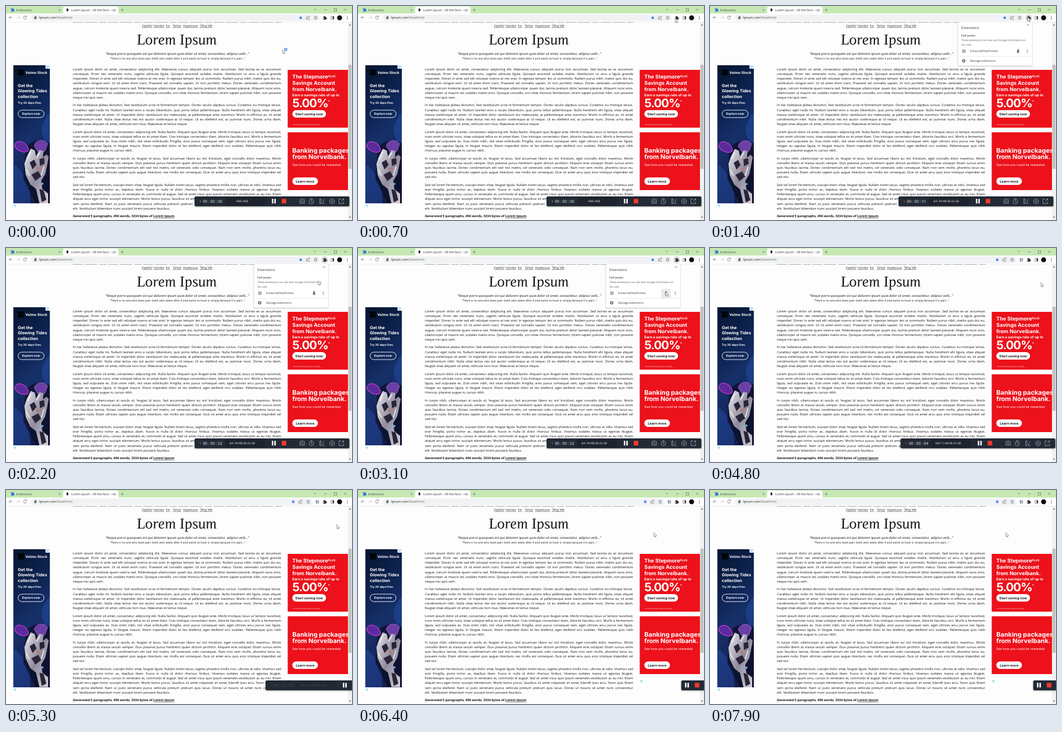
An HTML page for the animation above (8000 ms loop, 600 by 372 pixels).

```html
<!DOCTYPE html>
<html lang="en">
<head>
<meta charset="utf-8">
<title>Browser recording</title>
<style>
html, body { margin: 0; width: 100%; height: 100%; overflow: hidden; background: #fdfdfd; }
svg { display: block; width: 600px; height: 372px; }
text { font-family: "Open Sans", sans-serif; text-rendering: geometricPrecision; white-space: pre; }
.ad text { font-family: Inter, sans-serif; font-weight: 700; fill: #fff; }
.mid { text-anchor: middle; }
.line { fill: none; stroke: #666; stroke-width: .7; }
.bar .line { stroke: #b4b9c6; stroke-width: .7; }
</style>
</head>
<body>
<svg viewBox="0 0 600 372">
<defs>
  <linearGradient id="night" x1="0" y1="0" x2=".25" y2="1">
    <stop offset="0" stop-color="#07142f"/><stop offset=".35" stop-color="#0d2350"/>
    <stop offset=".6" stop-color="#16306a"/><stop offset="1" stop-color="#141d48"/>
  </linearGradient>
  <linearGradient id="silver" x1="0" y1="0" x2="1" y2="1">
    <stop offset="0" stop-color="#ebe8ef"/><stop offset=".5" stop-color="#8f8b9c"/><stop offset="1" stop-color="#d6d2dc"/>
  </linearGradient>
  <linearGradient id="fadeTab"><stop offset=".85" stop-color="#333"/><stop offset="1" stop-color="#333" stop-opacity=".1"/></linearGradient>
  <filter id="shadow" x="-10%" y="-20%" width="120%" height="140%">
    <feDropShadow dx="0" dy=".8" stdDeviation="1.3" flood-opacity=".35"/>
  </filter>
  <clipPath id="page"><rect y="28" width="593" height="344"/></clipPath>
  <clipPath id="banner"><rect x="12.5" y="103" width="63.5" height="240"/></clipPath>
  <path id="puzzle" d="M-2.600-1.700h1.600a1.100 1.100 0 1 1 2 0h1.600v1.600a1.100 1.100 0 1 1 0 2v1.400h-5.200v-1.600a1 1 0 1 0 0-1.800z"/>
  <path id="close" d="M-1.6-1.600 1.600 1.600M1.600-1.600-1.600 1.600"/>
  <g id="dots" fill="#555"><circle cy="-2.2" r=".7"/><circle r=".7"/><circle cy="2.2" r=".7"/></g>
  <g id="marker"><rect x="-3" y="-3" width="6" height="6" fill="#d9dfe8"/><path d="M-3-2h6M-3 0h6M-3 2h6" stroke="#7d8796" stroke-width=".8"/><path d="M-1.5-3v6" stroke="#5a78a8" stroke-width=".7"/></g>
  <path id="choices" d="M-2-2h4L0 2z" fill="#cdeef5" stroke="#6cc3d8" stroke-width=".6"/>
  <g id="pauseStop"><path d="M461 335.200h2.500v8h-2.500zM465.300 335.200h2.500v8h-2.500z" fill="#fff"/><rect x="478" y="335.200" width="8" height="8" rx=".6" fill="#f4372d"/></g>
</defs>

<!-- page -->
<rect width="600" height="372" fill="#fdfdfd"/>
<g clip-path="url(#page)" fill="#161616">
  <path d="M116 28.500H478" stroke="#666" stroke-width=".7" stroke-dasharray="17 3 22 4 12 3"/>
  <g id="langs" font-size="4.800" text-decoration="underline"></g>
  <text class="mid" transform="translate(297 67) skewX(9)" font-size="26.300" style="font-family:'Liberation Serif',serif" font-style="italic">Lorem Ipsum</text>
  <text class="mid" x="297" y="85" font-size="5.950" font-style="italic">"Neque porro quisquam est qui dolorem ipsum quia dolor sit amet, consectetur, adipisci velit..."</text>
  <text class="mid" x="297.500" y="93" font-size="4.850">"There is no one who loves pain itself, who seeks after it and wants to have it, simply because it is pain..."</text>
  <g id="copy" font-size="5.600"></g>
  <text x="116" y="367.200" font-size="5.600" font-weight="700">Generated 5 paragraphs, 496 words, 3334 bytes of <tspan text-decoration="underline">Lorem Ipsum</tspan></text>

  <g class="ad" clip-path="url(#banner)">
    <rect x="12.500" y="103" width="63.500" height="240" fill="url(#night)"/>
    <path d="M76 186C54 208 62 232 76 246zM12 275C30 285 44 312 42 343H12z" fill="#2450b0" opacity=".45"/>
    <g id="art">
      <path d="M34 246q18-20 42-8v106H52L30 300z" fill="#0b0f26" opacity=".75"/>
      <path d="M15 243C17 231 32 234 38 246S20 256 15 243z" fill="#5b2a9c" stroke="#d338d4" stroke-width="1.200"/>
      <path d="M49 243c2-10 16-13 23-4l-4 12-9 8z" fill="#6b3fa5" stroke="#b06be0" stroke-width=".8"/>
      <path d="M36 262l7-14 7 3 2 10 6-11 7 2-1 11 6-5 4 4-3 16-3 14-7 12 2 14 10 8v17H58l-6-25-10-8-8-17-2-19z" fill="url(#silver)"/>
      <path d="M41 272l8-5 4 9-7 8zM58 266l8-2 1 10-8 4zM44 293l12-6 5 9-10 8zM58 318l7 2 5 17-8 4z" fill="#29243a"/>
      <path d="M38 266l5-13M53 264l6-10M35 284l6 11M66 279l-5 16" stroke="#fff" stroke-width="1.300"/>
      <circle cx="55" cy="282" r="2.300" fill="#e2694f"/><circle cx="63" cy="309" r="2" fill="#5fb3e4"/>
    </g>
    <rect x="20.500" y="110" width="10.500" height="11" rx="1.500" fill="#020509"/>
    <text x="33.800" y="118" font-size="6.200">Velmo Stock</text>
    <g font-size="7.300"><text x="20.500" y="140.500">Get the</text><text x="20.500" y="150">Glowing Tides</text><text x="20.500" y="159.500">collection</text></g>
    <text x="20.500" y="169.500" font-size="5">Try 30 days free.</text>
    <rect x="21" y="181" width="45" height="13" rx="6.500" fill="none" stroke="#fff" stroke-width=".9"/>
    <text class="mid" x="43.500" y="189.400" font-size="5.200">Explore now</text>
    <rect x="68.500" y="103" width="7.500" height="6" fill="#e9f6fb"/><use href="#choices" x="72.300" y="106"/>
  </g>
  <use href="#choices" x="15.500" y="347.500"/>
  <use href="#choices" x="491.500" y="333"/>

  <g class="ad">
    <rect x="488.500" y="111" width="104.500" height="100.500" fill="#ec111a"/>
    <g font-size="9">
      <text x="496.500" y="126.300">The Stepmore<tspan font-size="5" dy="-2.500">PLUS</tspan></text>
      <text x="496.500" y="137">Savings Account</text>
      <text x="496.500" y="147.700">from Norvelbank.</text>
    </g>
    <text x="496.500" y="156.500" font-size="6.200">Earn a savings rate of up to</text>
    <text x="496.500" y="175.500" font-size="20.500" letter-spacing="-1">5.00%<tspan font-size="6" dy="-8">*</tspan></text>
    <rect x="496.500" y="181" width="58.500" height="13" rx="6.500" fill="#fff"/>
    <text class="mid" x="525.700" y="189.600" font-size="5.900" style="fill:#222">Start saving now</text>
    <text x="497" y="206.500" font-size="2.600" style="font-weight:400">*Six monthly rates quoted, terms apply.</text>
    <rect x="488.500" y="219.500" width="104.500" height="100.500" fill="#ec111a"/>
    <g font-size="11"><text x="496.500" y="254.700">Banking packages</text><text x="496.500" y="266">from Norvelbank.</text></g>
    <text x="496.500" y="278" font-size="5.500" style="font-weight:400">See how you could be rewarded.</text>
    <rect x="496.500" y="298" width="44.500" height="13" rx="6.500" fill="#fff"/>
    <text class="mid" x="518.700" y="306.600" font-size="5.900" style="fill:#222">Learn more</text>
  </g>
</g>
<rect x="593" y="28" width="7" height="344" fill="#f1f1f1"/>
<rect x="593.800" y="102" width="5.400" height="181" fill="#c1c1c1"/>
<path d="M594.800 34l1.700-2.500 1.700 2.500zM594.800 366l1.700 2.500 1.700-2.500z" fill="#666"/>

<!-- browser frame -->
<rect width="600" height="14" fill="#c5e8b3"/>
<rect y="13" width="600" height="15" fill="#fdfdfd"/>
<path d="M0 28.200H600" stroke="#ddd" stroke-width=".5"/>
<path d="M96 14q3 0 3-3V4q0-3 3-3h90q3 0 3 3v7q0 3 3 3z" fill="#fdfdfd"/>
<use href="#puzzle" x="11" y="6.500" fill="#3f73df"/>
<text x="18" y="8.800" font-size="5.300" fill="#444">Extensions</text>
<rect x="105" y="4.500" width="3" height="4.500" fill="#222"/>
<text x="113" y="8.800" font-size="5.300" fill="url(#fadeTab)">Lorem Ipsum - All the facts - Lips</text>
<g class="line">
  <use href="#close" x="93" y="7"/><use href="#close" x="188" y="7"/>
  <path d="M199 7h5M201.500 4.500v5M534 5l2 2 2-2M551.500 6.500h5M569 4.500h4.500v4.500H569z"/><use href="#close" x="588" y="6.500"/>
  <path d="M11 20H5.500M8 17.500 5.500 20 8 22.500"/><path d="M18.500 20H24M21.500 17.500 24 20l-2.500 2.500" stroke="#bbb"/>
  <path d="M35.200 18.500a2.700 2.700 0 1 0 .5 2.300M35.700 16.800v2.200h-2.200"/>
</g>
<rect id="pill" x="43" y="14.700" width="501" height="11.500" rx="5.700" fill="#f0f2f3"/>
<path d="M49.300 19.500h3.400v3h-3.400zM50 19.500v-1a1 1 0 0 1 2 0v1" fill="#666" stroke="#666" stroke-width=".5"/>
<text x="57" y="22.400" font-size="5.600" fill="#222">lipsum.com<tspan fill="#666">/feed/html</tspan></text>
<g id="pillIcons">
  <circle cx="511" cy="20.500" r="2.200" fill="#4285f4"/>
  <path class="line" d="M523 19h-2v4h5v-2M523 21q0-3 3-3M524.800 16.500l1.700 1.500-1.700 1.500M537 17l.9 2.100 2.200.2-1.700 1.500.6 2.300-2-1.200-2 1.200.6-2.300-1.700-1.500 2.200-.2z"/>
</g>
<use id="pinned" href="#marker" x="540" y="20.500"/>
<circle id="glow" cx="552.500" cy="20.500" r="6" fill="#d9dbde"/>
<use href="#puzzle" x="552.500" y="20.500" fill="#333"/>
<path d="M563.500 18h5v5h-5z" class="line"/><path d="M566.300 18h2.500v5h-2.500z" fill="#444"/>
<circle cx="578.500" cy="20.500" r="4.300" fill="#0b0b0b"/>
<use href="#dots" x="592" y="20.500"/>

<!-- extensions popup -->
<g id="popup">
  <rect x="430" y="28" width="128.500" height="75.500" rx="1.500" fill="#fff" filter="url(#shadow)"/>
  <g fill="#333">
    <text x="436" y="40.200" font-size="6.100">Extensions</text>
    <text x="436" y="52.700" font-size="4.700" font-weight="600">Full access</text>
    <g font-size="4.500" fill="#555"><text x="436" y="60.500">These extensions can see and change information on</text><text x="436" y="68.500">this site.</text></g>
    <text x="451" y="80.300" font-size="4.900">EnhancedTextPointer</text>
    <text x="451" y="97" font-size="4.900">Manage extensions</text>
  </g>
  <use href="#close" x="551.500" y="33" class="line"/>
  <use href="#marker" x="440.500" y="78.500"/>
  <rect id="hover" x="526" y="71" width="16.500" height="16" fill="#e8eaed"/>
  <path id="pin" d="M532.500 75.500h3.400v.8l-.6.300v2l1.100 1.100v.7h-1.800v2.100h-.8v-2.100H532v-.7l1.100-1.100v-2l-.6-.3z"/>
  <use href="#dots" x="550" y="78.500"/>
  <path d="M430 87.500h128.500" stroke="#ddd" stroke-width=".6"/>
  <circle cx="440" cy="95.200" r="1.900" fill="none" stroke="#555" stroke-width="1.300"/><circle cx="440" cy="95.200" r="2.800" fill="none" stroke="#555" stroke-width=".8" stroke-dasharray="1.100"/>
</g>

<!-- recorder -->
<g id="recorder" class="bar">
  <rect x="327" y="331" width="268.500" height="17.300" rx="2.500" fill="#232936" filter="url(#shadow)"/>
  <g id="readout" fill="#fff">
    <rect x="380" y="332" width="69" height="15.300" rx="2" fill="#1d222d"/>
    <circle id="dot" cx="337" cy="339.500" r="1.100"/>
    <text id="clock" x="341.500" y="341.900" font-size="6.700"></text>
    <text id="size" class="mid" x="409.500" y="341.300" font-size="4.800"></text>
  </g>
  <use href="#pauseStop"/>
  <path class="line" d="M509.500 336.500h2l1-1.300h2.200l1 1.300h2v6.300h-8.200zM515.300 339.500a1.700 1.700 0 1 1-3.400 0 1.700 1.700 0 0 1 3.400 0M533.500 339.800a4 4 0 1 1-8 0 4 4 0 0 1 8 0M529.500 337v3l2 1M528 334.700h3M544 335.500v8h2.500v-8zM549 342.500l2.500-6.500M548.500 343.500h4M565.500 335l4 2.300v4.600l-4 2.300-4-2.300v-4.600zM567 339.600a1.500 1.500 0 1 1-3 0 1.500 1.500 0 0 1 3 0M581 335.500h-3.500v8h8V340M581.500 339.500l4-4M583 335.500h2.500v2.500"/>
</g>
<g id="mini" class="bar">
  <rect x="454.500" y="331" width="50" height="17.300" rx="2.500" fill="#232936" filter="url(#shadow)"/>
  <use href="#pauseStop"/>
</g>
<g id="cursor">
  <path d="M0 0v7.200l1.700-1.500 1.100 2.500 1.100-.5-1.100-2.400h2.300z" fill="#fff" stroke="#444" stroke-width=".5"/>
  <circle id="busy" cx="5.700" cy="0" r="2" fill="none" stroke="#2f8be0" stroke-width="1.300"/>
</g>
</svg>
<script>
const $ = id => document.getElementById(id);
const clamp = v => Math.max(0, Math.min(1, v));
const LOOP = 8000, LEFT = 116, COLUMN = 361, LEADING = 8.15, PARAGRAPH_GAP = 5.4;

function addText(parent, x, y, content) {
  const el = document.createElementNS("http://www.w3.org/2000/svg", "text");
  el.setAttribute("x", x);
  el.setAttribute("y", y);
  el.textContent = content;
  parent.append(el);
  return el;
}

[["Español", 236], ["Svenska", 256], ["ไทย", 277], ["Türkçe", 289], ["Українська", 307], ["Tiếng Việt", 336]]
  .forEach(([name, x]) => addText($("langs"), x, 36, name));

const paragraphs = `Lorem ipsum dolor sit amet, consectetur adipiscing elit. Maecenas cursus aliquam purus non accumsan. Sed lacinia ex ac accumsan
consequat. Proin nec venenatis nunc, sagittis vehicula ligula. Quisque euismod sodales mattis. Vestibulum ut arcu a ligula gravida
imperdiet. Donec in ante sed elit volutpat viverra at nec erat. In egestas tempor leo ut commodo. Nullam purus nibh, mattis quis dui eu,
vestibulum congue sem. Ut sit amet enim nunc. Praesent vel convallis sapien. Ut non porttitor metus. Donec venenatis condimentum
augue, rutrum molestie quam viverra sed. Pellentesque ullamcorper quam dui, lacinia pretium dolor laoreet placerat. Aliquam nunc eros,
ullamcorper ut mauris vel, sodales mattis eros. Quisque convallis, orci vitae rhoncus fermentum, lorem sapien pulvinar nibh, non posuere
neque nisi quis sem.

In hac habitasse platea dictumst. Sed vestibulum urna id fermentum tempor. Donec iaculis dapibus cursus. Curabitur eu tristique lectus.
Curabitur eget nulla mi. Nullam laoreet eros a turpis bibendum, quis porta tellus pellentesque. Nulla hendrerit elit ligula, vitae aliquet
massa scelerisque sit amet. Ut imperdiet dolor vestibulum dui malesuada, at pellentesque ante maximus. Morbi in efficitur ex, sit amet
condimentum nibh. Nulla vitae lectus nec est auctor scelerisque ac id neque. Ut eu eleifend est, ac pulvinar nunc. Donec urna diam,
feugiat vitae aliquam sit amet, vehicula non risus. Maecenas et lectus neque.

Lorem ipsum dolor sit amet, consectetur adipiscing elit. Nulla facilisi. Aliquam quis feugiat ante. Morbi tristique, lacus ut tempor euismod,
nunc enim ultricies nunc, vitae volutpat tellus ex sit amet diam. Cras tristique consectetur diam, lobortis faucibus orci. Morbi a fermentum
ligula, sed vulputate ex. Duis enim nibh, nisl vitae sollicitudin fringilla, eros purus consequat sem, eget ultrices arcu purus nec ligula.
Integer eu egestas ligula, in feugiat mauris. Etiam imperdiet dolor et leo eleifend, eget eleifend orci sodales. Pellentesque quis nibh
rhoncus, placerat augue in, cursus nibh.

In turpis nibh, ullamcorper at iaculis et, feugiat id lacus. Sed accumsan libero eu nisl tincidunt, eget convallis dolor maximus. Morbi
convallis libero at massa iaculis semper. Duis placerat purus hendrerit quam dictum porttitor. Aliquam erat volutpat. Etiam cursus enim
quis faucibus lacinia. Donec condimentum elit sed nisl mattis, vel venenatis odio consequat. Nam non sem mollis, pharetra lacus eu,
posuere nulla. Etiam ultricies sapien quis augue interdum, nec mollis est consequat. Duis sit amet arcu quis eros tristique imperdiet vel
sed nisi.

Sed vel lorem fermentum, suscipit dolor vitae, feugiat ligula. Nullam lorem lacus, sagittis pharetra mollis non, ultrices at odio. Vivamus sed
erat fringilla, porta tortor ac, dapibus diam. Fusce in nulla id dolor rhoncus finibus. Vivamus sodales massa ut egestas feugiat.
Pellentesque quam arcu, cursus in venenatis at, commodo id augue. Sed sit amet risus quis ipsum venenatis vestibulum ac eu nisi. Etiam
aliquet arcu eget tortor suscipit elementum. Morbi lectus purus, faucibus sit amet vulputate sit amet, blandit quis arcu. Nunc quis Etiam
sem porta eleifend. Nam ut justo venenatis purus vehicula pretium pretium quis lacus. Donec ut mauris sit amet nunc consectetur
elit. Vestibulum bibendum nunc suscipit lorem posuere faucibus.`.split("\n\n");

// Justify every line but the last by widening its word gaps.
let baseline = 112;
for (const paragraph of paragraphs) {
  const lines = paragraph.split("\n");
  lines.forEach((line, i) => {
    const el = addText($("copy"), LEFT, baseline, line);
    if (i < lines.length - 1) {
      const gap = (COLUMN - el.getComputedTextLength()) / (line.split(" ").length - 1);
      el.style.wordSpacing = gap + "px";
    }
    baseline += LEADING;
  });
  baseline += PARAGRAPH_GAP;
}

const route = [[0, 479.5, 75.5], [700, 550, 21.5], [900, 551, 19.5], [1800, 551, 19.5], [2200, 541, 57],
  [2700, 533, 76], [4100, 534.5, 76.5], [4600, 573.7, 60], [5300, 573.7, 60], [5500, 548, 73], [6200, 513, 74]];

function position(t) {
  const next = route.findIndex(p => p[0] > t);
  if (next < 0) return route.at(-1).slice(1);
  const [t0, x0, y0] = route[next - 1], [t1, x1, y1] = route[next];
  const k = (t - t0) / (t1 - t0);
  return [x0 + (x1 - x0) * k, y0 + (y1 - y0) * k];
}

const show = (id, visible) => $(id).style.display = visible ? "" : "none";
const shift = (id, x, y = 0) => $(id).setAttribute("transform", `translate(${x} ${y})`);

function draw(t) {
  shift("cursor", ...position(t));
  show("busy", t < 300);

  const open = t >= 1200 && t < 4500;
  show("popup", open);
  show("glow", open);
  $("popup").style.opacity = clamp((t - 1000) / 400);
  show("hover", t >= 2700);
  $("pin").setAttribute("fill", t >= 3700 ? "#1a73e8" : "#555");

  const pinned = t >= 4000;
  show("pinned", pinned);
  shift("pillIcons", pinned ? -13 : 0);
  $("pill").setAttribute("width", pinned ? 488 : 501);

  const seconds = Math.max(0, Math.floor((t - 200) / 1000));
  $("clock").textContent = `00 : 00 : 0${seconds}`;
  $("size").textContent = seconds ? `${seconds < 3 ? "641.99" : "660.71"} KB/38.22 GB` : "0KB /0KB";
  $("dot").setAttribute("fill", seconds ? "#f4372d" : "#99a");

  // The full bar accelerates off the edge, then the compact one slides in.
  shift("recorder", 277 * clamp((t - 4700) / 900) ** 2);
  $("readout").style.opacity = 1 - .85 * clamp((t - 4800) / 500);
  show("recorder", t < 5600);
  const arrive = 1 - clamp((t - 5600) / 600);
  shift("mini", 106 + 42 * arrive * arrive);
  show("mini", t >= 5600);

  shift("art", 0, .6 * Math.sin(t / LOOP * 2 * Math.PI));
}

function tick() {
  draw(Math.floor(performance.now() % LOOP / 100) * 100);
  requestAnimationFrame(tick);
}
tick();
</script>
</body>
</html>
```
